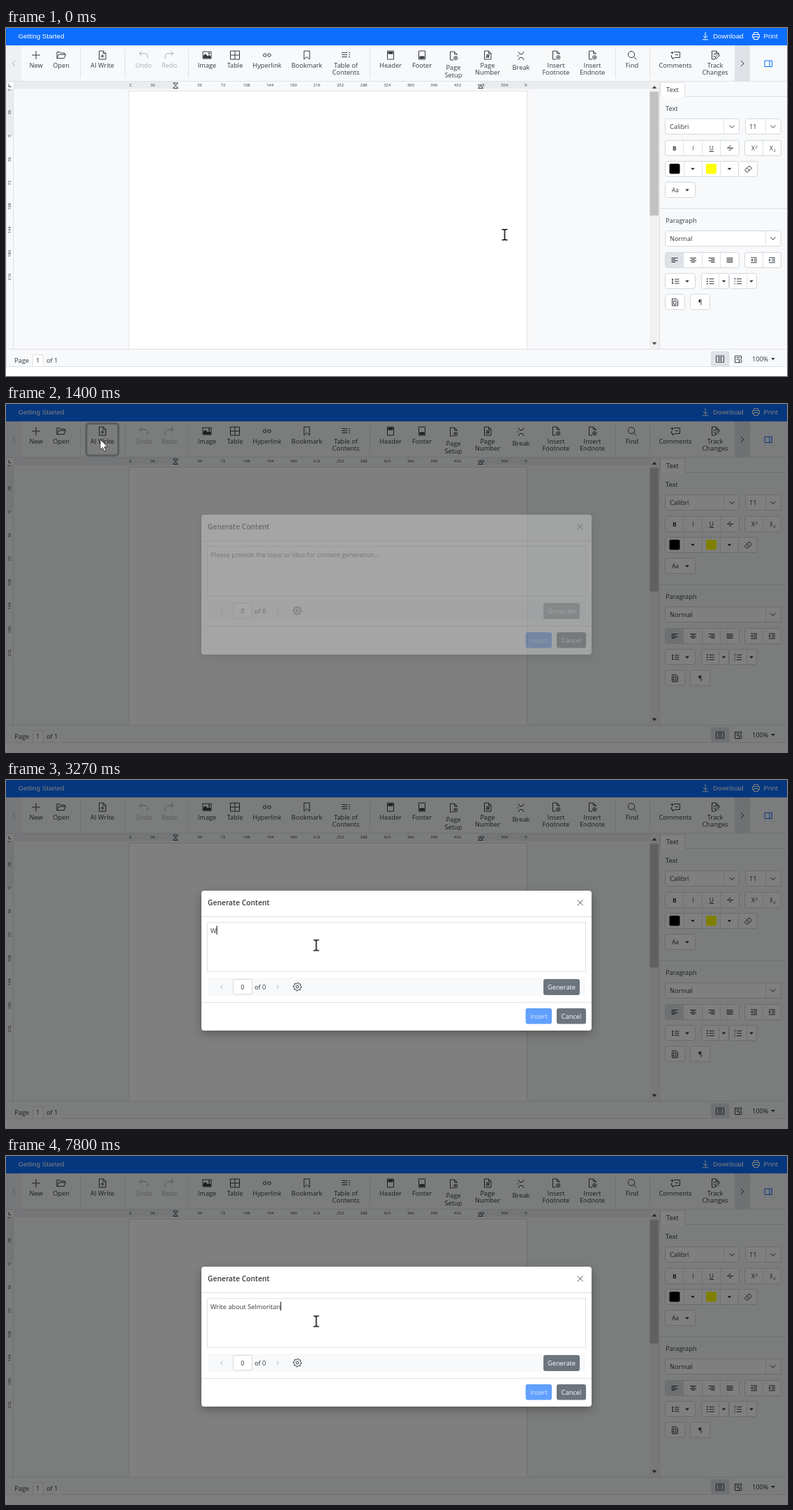
An HTML page for the animation above (8000 ms loop, 1119 by 500 pixels).

```html
<!DOCTYPE html>
<html lang="en">
<head>
<meta charset="utf-8">
<title>Document editor</title>
<style>
html, body { margin: 0; width: 100%; height: 100%; overflow: hidden; background: #fff; }
svg { display: block; }
text { font: 9.25px "Open Sans", "Noto Sans", sans-serif; fill: currentColor; white-space: pre; }
svg { color: #343a40; }
.mid { text-anchor: middle; }
.head { font-weight: 500; }
.title { font-size: 10.3px; font-weight: 600; }
.bar { font: 9.8px "Liberation Sans", Arial, sans-serif; }
.tick { font-size: 5.9px; text-anchor: middle; }
.small { font-size: 8.4px; text-anchor: middle; }
.line { fill: none; stroke: currentColor; }
.rule { fill: none; stroke: #dee2e6; }
.field { fill: #fff; stroke: #d3d8dd; }
.solid { fill: currentColor; }
.off { color: #a9aeb3; }
.light { color: #fff; }

.loop, #cursor > g { animation: 8s step-end infinite; }
#ai { animation-name: ai-ink; }
#ai-fill { animation-name: ai-fill; }
#ring { animation-name: ring; }
#shade { animation-name: shade; }
#dialog { animation-name: dialog; }
#hint { animation-name: hint; }
#generate { animation-name: enable; }
#cursor { animation-name: move; }
#cursor > .beam { animation-name: beam; }
#cursor > .arrow { animation-name: arrow; }
#cursor > .hand { animation-name: hand; }

@keyframes ai-ink { 0%, 16.6% { color: #343a40 } 10% { color: #fff } }
@keyframes ai-fill {
  0%, 16.6% { fill: transparent }
  10% { fill: #5c636a }
  15% { fill: #565e64 }
}
@keyframes ring { 0%, 30.8% { opacity: 0 } 15% { opacity: 1 } 30% { opacity: .5 } }
@keyframes shade { 0% { opacity: 0 } 16.6%, 100% { opacity: .5 } }
@keyframes dialog {
  0% { opacity: 0 }
  16.6% { opacity: .03 }
  17.5% { opacity: .3 }
  18.3% { opacity: .6 }
  19.1% { opacity: .82 }
  20% { opacity: .95 }
  20.8%, 100% { opacity: 1 }
}
@keyframes hint { 0% { opacity: 1 } 30%, 100% { opacity: 0 } }
@keyframes enable { 0% { opacity: .65 } 40.8%, 100% { opacity: 1 } }
@keyframes move {
  0% { transform: translate(714.5px, 297px) }
  .87% { transform: translate(586.5px, 254.5px) }
  3.37% { transform: translate(586.5px, 254.5px); animation-timing-function: steps(8, jump-both) }
  10% { transform: translate(139px, 37px) }
  12.5% { transform: translate(126px, 50px) }
  15% { transform: translate(133px, 50px) }
  16.6% { transform: translate(135px, 51px) }
  20% { transform: translate(135px, 51px); animation-timing-function: steps(6, jump-both) }
  25% { transform: translate(446.5px, 236px) }
  25.8% { transform: translate(446px, 236px) }
  26.6% { transform: translate(445px, 237px) }
  27.5%, 100% { transform: translate(444.5px, 237.5px) }
}
@keyframes beam { 0%, 24.1%, 100% { opacity: 1 } 8.3% { opacity: 0 } }
@keyframes arrow { 0%, 10%, 24.1%, 100% { opacity: 0 } 8.3%, 16.6% { opacity: 1 } }
@keyframes hand { 0%, 16.6%, 100% { opacity: 0 } 10% { opacity: 1 } }
</style>
</head>
<body>
<svg width="1119" height="500" viewBox="0 0 1119 500">
  <defs>
    <clipPath id="ruler-clip"><rect x="176" y="77" width="571" height="11"/></clipPath>
    <filter id="soft" x="-10%" y="-20%" width="120%" height="150%"><feGaussianBlur stdDeviation="7"/></filter>
  </defs>
  <g id="editor"></g>
  <rect id="shade" class="loop" width="1119" height="500"/>
  <g id="dialog" class="loop">
    <rect x="280" y="164" width="559" height="200" rx="4" opacity=".3" filter="url(#soft)"/>
    <rect x="280" y="159" width="559" height="201" rx="4" fill="#fff"/>
    <path class="rule" d="M280 196.5H839M280 319.5H839"/>
    <text class="title" x="289" y="179.5">Generate Content</text>
    <path class="line" d="M818.8 172.3l8 8m0-8l-8 8" stroke-width=".9"/>
    <rect class="rule" x="288.5" y="204.5" width="542" height="71"/>
    <text id="hint" class="loop" x="293" y="219.5" color="#5c6268">Please provide the topic or idea for content generation...</text>
    <text id="typed" x="293" y="219.5"></text>
    <rect id="caret" y="209.5" width="1" height="12.5"/>
    <rect x="289" y="284" width="541" height="26" fill="#f8f9fa"/>
    <path class="line off" d="M310.3 294.4l-2.7 2.8 2.7 2.8M388 294.4l2.7 2.8-2.7 2.8"/>
    <rect class="field" x="325.5" y="286.5" width="27" height="21.5" rx="2"/>
    <text class="mid" x="339" y="300.7">0</text>
    <text x="356" y="300.7">of 0</text>
    <g class="line" transform="translate(417.5 297)">
      <circle r="1.9"/>
      <path id="gear" stroke-linejoin="round"/>
    </g>
    <g id="generate" class="loop">
      <rect x="770" y="286" width="52" height="23" rx="3" fill="#6c757d"/>
      <text class="mid light" x="796" y="301">Generate</text>
    </g>
    <rect x="744.5" y="328" width="37.5" height="22.5" rx="3" fill="#0d6efd" opacity=".65"/>
    <text class="mid light" x="763.3" y="342.8" opacity=".75">Insert</text>
    <rect x="789" y="328" width="42" height="22.5" rx="3" fill="#6c757d"/>
    <text class="mid light" x="810" y="342.8">Cancel</text>
  </g>
  <g id="cursor" class="loop">
    <g class="beam"><path d="M-4-7.5h2.5Q0-7.5 0-6Q0-7.5 1.5-7.5H4M0-6.5V6M-4 7.5h2.5Q0 7.5 0 6Q0 7.5 1.5 7.5H4" fill="none" stroke="#000" stroke-width="1.5"/></g>
    <g class="arrow"><path d="M0 0V14.6l3.4-3.2 2.4 5.4 2.3-1-2.3-5.2h4.6z" fill="#fff" stroke="#222" stroke-width=".8"/></g>
    <g class="hand"><path d="M-1.5 1.2a1.4 1.4 0 0 1 2.8 0V6.5c.3-1 2.3-.8 2.4.4.4-.9 2.2-.6 2.3.6.5-.7 2-.4 2 .9V13c0 3-1.5 5-3.5 5.5H1.5C-.5 17-2 14-4 11.5c-.8-1.2.8-2.2 1.8-1.1l.7.9z" fill="#fff" stroke="#222" stroke-width=".9"/></g>
  </g>
</svg>
<script>
const $ = id => document.getElementById(id);
const text = (x, y, s, cls = '') => `<text x="${x}" y="${y}" class="${cls}">${s}</text>`;
const rect = (x, y, w, h, fill, rx = 0) => `<rect x="${x}" y="${y}" width="${w}" height="${h}" fill="${fill}" rx="${rx}"/>`;
const path = (d, cls = 'line') => `<path class="${cls}" d="${d}"/>`;
const at = (x, y, body) => `<g transform="translate(${x} ${y})">${body}</g>`;
const range = (from, to) => Array.from({ length: to - from + 1 }, (_, i) => from + i);

const page = 'M-4.5-6H1.5L5-2.5V6H-4.5zM1.5-6V-2.5H5';
const halfPage = 'M0 6H-4.5V-6H1.5L5-2.5V-1M1.5-6V-2.5H5';
const cog = '<circle class="line" cx="3.2" cy="3.2" r="2.6"/><circle class="solid" cx="3.2" cy="3.2" r="1.1"/>';
const undo = path('M-2.5-5.5L-6-2.3L-2.5.9M-6-2.3H2Q6-2.3 6 2V5');
const sheet = path('M-4.5-6h9V6h-9z');

const icons = {
  plus: path('M-6 0H6M0-6V6'),
  open: path('M-6 4.5V-4.5H-2L-.5-3H5V-1M-6 4.5L-3.5-1H6.5L4.3 4.5z'),
  write: path(page + 'M-2.4 1.3H2.8M.2-1.3V3.9'),
  undo,
  redo: `<g transform="scale(-1 1)">${undo}</g>`,
  image: path('M-6-5H6V5H-6z') + path('M-5.5 4.5V1L-2.5-2L1 1.5L3-.5L5.5 2V4.5z', 'solid') + '<circle class="solid" cx="3" cy="-2.5" r="1.2"/>',
  table: path('M-6.5-6H6.5V6H-6.5zM0-6V6M-6.5 0H6.5'),
  link: path('M-1-2H-3.5a2 2 0 0 0 0 4H-1M1-2H3.5a2 2 0 0 1 0 4H1M-2.5 0H2.5'),
  bookmark: path('M-4-6H4V6L0 2.5L-4 6z'),
  contents: path('M-6-3.5H2M-6-.5H2M-6 2.5H2M4-3.5H6M4-.5H6M4 2.5H6'),
  header: sheet + rect(-3.5, -5, 7, 3.5, 'currentColor'),
  footer: sheet + rect(-3.5, 1.5, 7, 3.5, 'currentColor'),
  cogPage: path(halfPage) + cog,
  number: path(page + 'M-2 0H3M-2.5 2.5H2.5M-.3-1.5L-1.2 4M2-1.5L1.1 4'),
  split: path('M-4-6L-2-2.5H2L4-6M-4 6L-2 2.5H2L4 6M-5.5 0H-3.5'),
  find: '<circle class="line" cx="-1" cy="-1" r="4.6"/>' + path('M2.3 2.3L6.3 6.3'),
  comment: path('M-2-4.5H6.5V3.5H-1L-3.5 6V3.5H-5.5V0M-6.5-3.5H-2.5M-4.5-5.5V-1.5M0-.5H4'),
  track: path(halfPage + 'M-2.5-1.5H1.5M-2.5 1.5H0M0 5L.7 2.5L5-1.5L6.5 0L2.5 4.5z'),
  chevron: path('M-3.5-1.8L0 1.8L3.5-1.8'),
  drop: path('M-2.8-1.5H2.8L0 1.8z', 'solid'),
};

// label lines are split by "|"
const tools = [
  [43, 'New', 'plus'], [79, 'Open', 'open'], [197, 'Undo', 'undo'], [234, 'Redo', 'redo'],
  [288, 'Image', 'image'], [328, 'Table', 'table'], [374, 'Hyperlink', 'link'],
  [431, 'Bookmark', 'bookmark'], [487, 'Table of|Contents', 'contents'],
  [551, 'Header', 'header'], [596, 'Footer', 'footer'], [641, 'Page|Setup', 'cogPage', 3],
  [690, 'Page|Number', 'number'], [738, 'Break', 'split', 3],
  [788, 'Insert|Footnote', 'cogPage'], [840, 'Insert|Endnote', 'cogPage'],
  [897, 'Find', 'find'], [959, 'Comments', 'comment'], [1016, 'Track|Changes', 'track'],
];
const tool = ([x, label, icon, drop = 0]) =>
  `<g class="${/do$/.test(label) ? 'off' : ''}">` + at(x, 39 + drop / 3, icons[icon]) +
  label.split('|').map((s, i) => text(x, 57 + drop + i * (drop ? 11 : 9.6), s, 'mid')).join('') + '</g>';

function chrome() {
  return rect(0, 0, 1119, 500, '#fff') + rect(0, 25, 1119, 462, '#f8f9fa') +
    rect(0, 0, 1119, 25, '#0d6efd') +
    `<g class="light">${text(17.5, 15.3, 'Getting Started', 'bar')}${text(1013, 15.3, 'Download', 'bar')}${text(1085.5, 15.3, 'Print', 'bar')}` +
    at(1002, 11.5, path('M0-5.5V3M-3-.2L0 3L3-.2M-4 5.2H4')) +
    at(1074.5, 11.5, path('M-3-2V-5H3V-2M-3 2.5H-5V-2H5V2.5H3M-3 1H3V5H-3z')) + '</g>' +
    rect(0, 25, 22.5, 52, '#eef0f2') + rect(1044, 25, 22, 52, '#dee2e6') +
    path('M13 47L9.5 51L13 55', 'line off') + path('M1053 47L1057 51L1053 55') +
    `<g color="#0d6efd">${path('M1087 47h10.5v8.5h-10.5zM1094 47v8.5')}</g>` +
    path([106, 170, 261, 521, 873, 922].map(x => `M${x}.5 30V72`).join(''), 'rule') +
    path('M0 76.5H1119', 'rule') +
    '<rect id="ring" class="loop" x="115" y="28" width="46" height="46" rx="4" fill="none" stroke="#828a91" stroke-opacity=".55" stroke-width="3"/>' +
    '<g id="ai" class="loop"><rect id="ai-fill" class="loop" x="116" y="29" width="44" height="44" rx="3"/>' +
    at(138, 39, icons.write) + text(138, 57, 'AI Write', 'mid') + '</g>' +
    tools.map(tool).join('');
}

function rulers() {
  const side = range(-2, 6).map(k => at(7, 155 + 33.8 * k,
    `<text class="tick" transform="rotate(-90)">${Math.abs(36 * k)}</text>`)).join('');
  const top = range(-2, 15).filter(k => k).map(k =>
    text(243.8 + 33.6 * k, 84.2, Math.abs(36 * k), 'tick')).join('');
  const marks = range(-2, 14).map(k => `M${(259.8 + 33.6 * k).toFixed(1)} 81v2`).join('');
  return rect(0, 87, 11, 68, '#e9ecef') + rect(0, 155, 11, 306, '#f8f9fa') + side +
    path('M10.5 87V461', 'rule') +
    rect(0, 77, 922, 10.5, '#e9ecef') + rect(243, 77, 437, 10.5, '#f8f9fa') +
    `<g clip-path="url(#ruler-clip)">${top}${path(marks, 'rule')}</g>` +
    rect(1, 78, 9.5, 9, '#fff') + path('M4 80.5V84.5H7.5') +
    path('M239.5 79H246.5L243 82.5zM239.5 86.5H246.5L243 82.5z') +
    path('M676.5 86.5H683.5L680 82.5z');
}

function canvasArea() {
  return `<rect x="176" y="90.5" width="570.5" height="372" fill="#fff" stroke="#dee2e6"/>` +
    rect(922, 77, 14, 384, '#f1f1f1') + rect(922.5, 91.5, 12.5, 178, '#c1c1c1') +
    `<g color="#505050">${path('M925.5 87L929 83L932.5 87zM925.5 451.5L929 455.5L932.5 451.5z', 'solid')}</g>` +
    rect(0, 461, 1119, 26, '#f8f9fa') + path('M0 461.5H1119M0 486.5H1119M.5 77V487', 'rule') +
    text(12, 481, 'Page') + '<rect class="rule" x="38.5" y="469.5" width="14.5" height="17" style="fill:#fff"/>' +
    text(45.7, 481, '1', 'mid') + text(58, 481, 'of 1') +
    rect(1010, 464.5, 26.5, 22, '#dee2e6', 2) +
    at(1023, 475.7, path('M-5.5-4.5H5.5V4.5H-5.5zM-3-2.2H3M-3 0H3M-3 2.2H3')) +
    at(1049, 475.7, path('M3 5H-4.5V-4.5H4.5V0M-2.5-2H2.5M-2.5 .5H1.5') + '<circle class="line" cx="3.2" cy="3" r="2"/>') +
    text(1069, 479, '100%') + at(1099, 475.5, icons.drop);
}

// a bordered row of buttons with dividers at the given x positions
const group = (x, y, w, splits = [], h = 22) =>
  `<rect class="field" x="${x}.5" y="${y}.5" width="${w}" height="${h}" rx="3"/>` +
  path(splits.map(s => `M${s}.5 ${y}.5v${h}`).join(''), 'rule');
const bars = widths => path(widths.map((w, i) => {
  const [a, b] = w;
  return `M${a} ${i * 2 - 3}H${b}`;
}).join(''));

function sidebar() {
  const long = [-4.5, 4.5];
  const listRows = path('M-2-3.5H5M-2 0H5M-2 3.5H5');
  const dots = [-3.5, 0, 3.5].map(y => `<circle class="solid" cx="-4.8" cy="${y}" r="1"/>`).join('');
  const indent = dir => path('M-4.5-3.5H4.5M0-1.2H4.5M0 1.2H4.5M-4.5 3.5H4.5') + path(`M${-3 - dir * 1.5}-1.7V1.7L${-3 + dir * 1.5} 0z`, 'solid');
  return path('M936.5 77V461M973 98.5H1119M937 259.5H1119', 'rule') +
    '<path d="M937.5 99V78.5H972.5V99" fill="#fff" stroke="#dee2e6"/>' + text(946, 92, 'Text') +
    text(945, 118.5, 'Text', 'head') +
    group(944, 130, 106, [1028]) + text(951, 145.3, 'Calibri') + at(1040, 141.7, icons.chevron) +
    group(1059, 130, 51, [1088]) + text(1065, 145.3, '11') + at(1099, 141.7, icons.chevron) +
    group(944, 161, 106, [970, 997, 1023]) + group(1058, 161, 52, [1084]) +
    `<text class="small" x="957.7" y="175.5" font-weight="700" style="font-weight:700">B</text>` +
    `<text class="small" x="984.3" y="175.5" style="font-style:italic">I</text>` +
    `<text class="small" x="1010.7" y="175.5">U</text>` + path('M1007.5 177.5h6.5') +
    `<text class="small" x="1037.3" y="175.5">S</text>` + path('M1033 172.5h9') +
    text(1070.5, 176, 'X', 'small') + text(1075.3, 172.5, '2', 'tick') +
    text(1096.5, 175.5, 'X', 'small') + text(1101.3, 178, '2', 'tick') +
    group(944, 191, 105, [971, 997, 1023]) + group(1049, 191, 27) +
    rect(950.5, 195, 15, 14.5, '#000', 2) + rect(1003, 195, 15, 14.5, '#ff0', 2) +
    at(984, 202.5, icons.drop) + at(1036.5, 202.5, icons.drop) +
    at(1063.5, 202.5, path('M-5 1.5L1.5-4.5L5-1L-1 4.5H-2.5zM-2-1.3L1.7 2.2')) +
    group(944, 221, 43) + text(959, 236, 'Aa', 'small') + at(976, 233, icons.drop) +
    text(945, 279.5, 'Paragraph', 'head') +
    group(944, 291, 166, [1088]) + text(951, 306.3, 'Normal') + at(1099, 302.3, icons.chevron) +
    group(944, 322, 106, [970, 997, 1023]) + group(1058, 322, 52, [1084]) +
    rect(945, 323, 26, 21.5, '#dee2e6', 2) +
    at(958, 333.5, bars([long, [-4.5, 1], long, [-4.5, 1]])) +
    at(984.5, 333.5, bars([long, [-2.5, 2.5], long, [-2.5, 2.5]])) +
    at(1011, 333.5, bars([long, [-1, 4.5], long, [-1, 4.5]])) +
    at(1037, 333.5, bars([long, long, long, long])) +
    at(1071.5, 333.5, indent(-1)) + at(1097.5, 333.5, indent(1)) +
    group(944, 352, 43) + at(959, 364, path('M-1-3H5.5M-1 0H5.5M-1 3H5.5M-4-3V3') + path('M-5.5-2L-4-4.3L-2.5-2zM-5.5 2L-4 4.3L-2.5 2z', 'solid')) + at(976, 364, icons.drop) +
    group(996, 352, 39, [1021]) + at(1009.5, 364, listRows + dots) + at(1028.5, 364, icons.drop) +
    group(1036, 352, 39, [1061]) + at(1049, 364, listRows + path('M-4.5-5V-2.5M-5.5 0H-4M-5.5 3.5H-4')) + at(1068, 364, icons.drop) +
    group(944, 382, 28) + at(958.5, 394, path('M-4-5H1.5L4-2.5V5H-4zM-2-2H1.5V3H-2z')) +
    group(980, 382, 28) + text(994.7, 397.3, '¶', 'mid');
}

$('editor').innerHTML = chrome() + rulers() + canvasArea() + sidebar();

$('gear').setAttribute('d', 'M' + range(0, 31).map(i => {
  const r = i % 4 < 2 ? 6 : 4.5, a = i * Math.PI / 16;
  return `${(r * Math.cos(a)).toFixed(2)} ${(r * Math.sin(a)).toFixed(2)}`;
}).join('L') + 'z');

const phrase = 'Write about Selmoritan';
const keyTimes = [3270, 3530, 3870, 4000, 4130, 4270, 4600, 4800, 4930, 5070, 5270,
  5400, 5800, 6330, 6530, 6670, 6870, 6930, 7400, 7500, 7600, 7800];
const typed = $('typed'), caret = $('caret');
let start;

function tick(now) {
  start ??= now;
  const t = (now - start) % 8000;
  typed.textContent = phrase.slice(0, keyTimes.filter(k => k <= t).length);
  caret.setAttribute('x', 293 + typed.getComputedTextLength());
  const lit = t >= 2400 && t < 2930 || t >= keyTimes[0];
  caret.setAttribute('visibility', lit ? 'visible' : 'hidden');
  requestAnimationFrame(tick);
}
requestAnimationFrame(tick);
</script>
</body>
</html>
```
